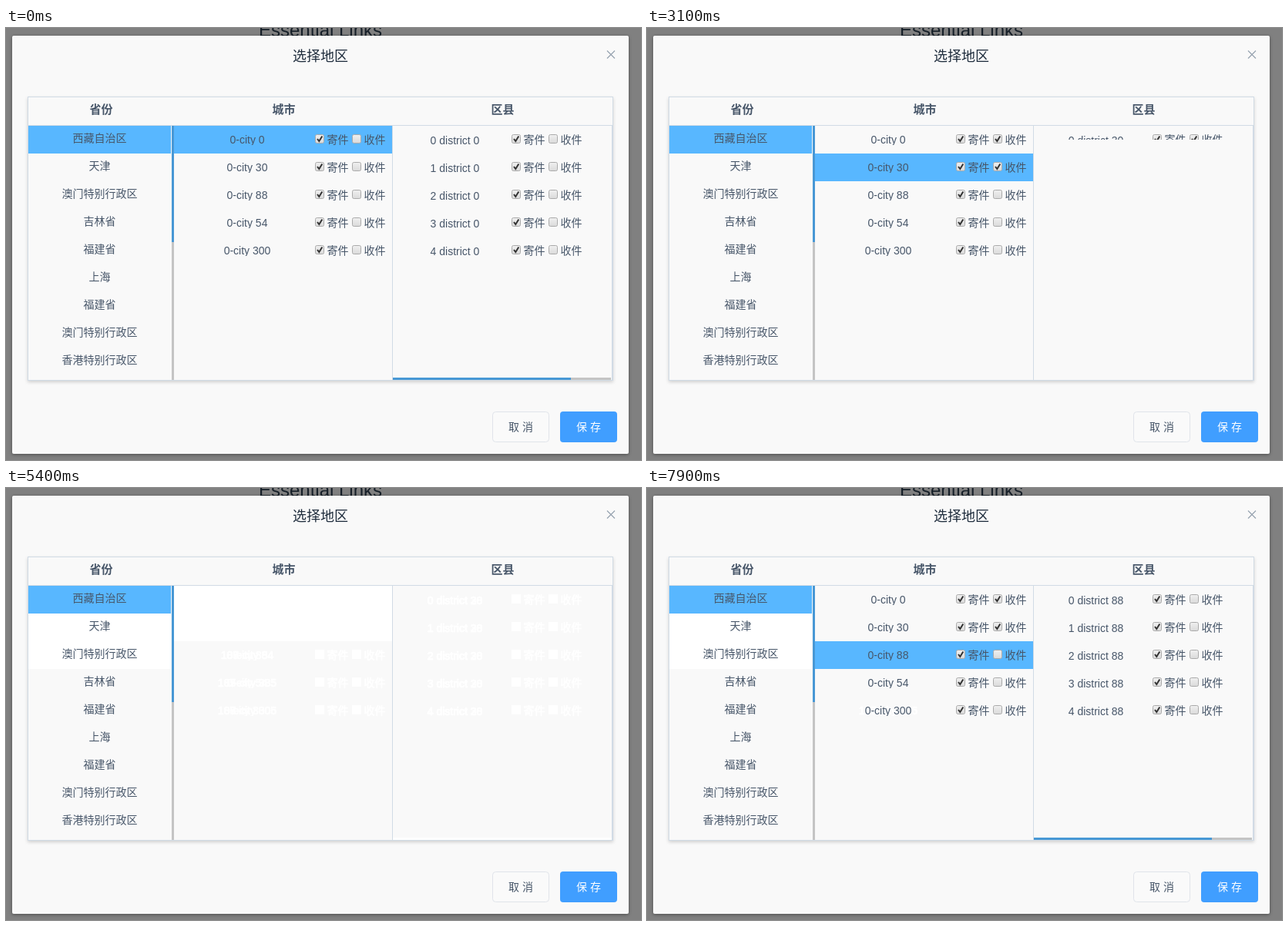
Recreate the animation shown at these times as an HTML page. Size 824x561 px, loop 9.2 s.

```html
<!DOCTYPE html>
<html lang="zh-CN">
<head>
<meta charset="utf-8">
<title>选择地区</title>
<style>
  html, body { margin: 0; width: 100%; height: 100%; overflow: hidden; background: #808080; }
  svg { display: block; width: 100vw; height: 100vh; }
  text { font: 14px "Liberation Sans", "Noto Sans CJK SC", "Noto Sans CJK", sans-serif; fill: #475669; }
  .mid { text-anchor: middle; }
  .head { font-size: 15px; font-weight: bold; }
  .title { font-size: 18px; fill: #1f2d3d; font-weight: 300; }
  .back { font-size: 24px; fill: #161f28; }
  .ghost text { fill: #fff; stroke: #fff; stroke-width: .7px; }
  .dialog { filter: drop-shadow(0 1px 2px rgba(0,0,0,.4)); }
  .table { filter: drop-shadow(0 2px 2px rgba(0,0,0,.16)); }
</style>
</head>
<body>
<svg viewBox="0 0 824 561" xmlns="http://www.w3.org/2000/svg">
  <defs>
    <linearGradient id="box" x2="0" y2="1">
      <stop stop-color="#f0f0f0"/><stop offset="1" stop-color="#dadada"/>
    </linearGradient>
    <clipPath id="line"><rect x="218" y="0" width="283" height="25"/></clipPath>
    <clipPath id="cityClip"><rect id="cityOpen" x="218" y="127" width="283" height="327"/></clipPath>
    <clipPath id="distClip"><rect id="distOpen" x="502" y="127" width="284" height="327"/></clipPath>
  </defs>
  <rect width="824" height="561" fill="#808080"/>
  <text class="mid back" x="408" y="11">Essential Links</text>
  <rect class="dialog" x="8" y="10" width="800" height="543" rx="2" fill="#f9f9f9"/>
  <text class="mid title" x="408" y="43">选择地区</text>
  <path d="M780 29.5l10 10m0-10l-10 10" stroke="#97a3b0" stroke-width="1.2"/>
  <rect class="table" x="28.5" y="89.5" width="759" height="368" fill="#f9f9f9" stroke="#d1dbe5"/>
  <text class="mid head" x="123.5" y="111">省份</text>
  <text class="mid head" x="360.5" y="111">城市</text>
  <text class="mid head" x="644.5" y="111">区县</text>
  <g id="provinces"></g>
  <g id="ghosts" class="ghost"></g>
  <g id="cities" clip-path="url(#cityClip)"></g>
  <g id="districts" clip-path="url(#distClip)"></g>
  <path d="M29 126.5H787M501.5 127V457M786.5 127V457" stroke="#d1dbe5"/>
  <rect x="215" y="127" width="3" height="330" fill="#c4c4c4"/>
  <rect x="215" y="127" width="3" height="151" fill="#4898d5"/>
  <g id="bar"></g>
  <rect x="631.5" y="498.5" width="73" height="39" rx="4" fill="#fafafa" stroke="#e0e4ea"/>
  <text class="mid" x="668" y="523">取 消</text>
  <rect x="719" y="498" width="74" height="40" rx="4" fill="#409eff"/>
  <text class="mid" x="756" y="523" style="fill:#fff">保 存</text>
</svg>
<script>
const LOOP = 9200, TOP = 127, ROW = 36, FULL = 327;
const BLUE = '#58b7ff', HOVER = '#e4e8f1', PLAIN = '#f9f9f9';
const provinces = ['西藏自治区', '天津', '澳门特别行政区', '吉林省', '福建省', '上海', '福建省', '澳门特别行政区', '香港特别行政区'];
const lists = [
  { id: 0, ids: [0, 30, 88, 54, 300] },
  { id: 105, ids: [20, 67, 34, 385, 306] },
  { id: 187, ids: [28, 71, 54, 335, 305] }
];

const start = {
  prov: 0, city: 0, over: '', openCity: FULL, openDist: FULL,
  got: [], white: [], whiteProv: [], ghostRows: [], ghostLists: [], ghostDist: []
};
const steps = [[0, start]];
const at = (time, change) => steps.push([time, change]);

// A list unfolds in three pictures, 100 ms apart.
function unfold(time, keys) {
  [18, 100, FULL].forEach((h, i) =>
    at(time + i * 100, Object.fromEntries(keys.map(k => [k, h]))));
}
function pickCity(time, city, more) {
  at(time, { city, over: '', ...more });
  unfold(time, ['openDist']);
}
function pickProvince(time, prov, more) {
  at(time, { prov, city: 0, over: '', openCity: 0, openDist: 0, ...more });
  unfold(time + 100, ['openCity', 'openDist']);
}

at(100, { over: 'd1' });
at(200, { over: 'c1' });
pickCity(800, 1);
at(1300, { over: 'c0' });
pickCity(1400, 0);
pickCity(2400, 0, { got: [0] });
at(2700, { over: 'c1' });
pickCity(3100, 1, { got: [0, 1] });
at(3400, { over: 'p1' });
pickProvince(3900, 1, {
  white: [1], whiteProv: [0], ghostRows: [0, 2, 3, 4], ghostLists: [0], ghostDist: [30]
});
at(4400, { over: 'p2' });
pickProvince(4700, 2, {
  white: [0, 1], whiteProv: [0, 1], ghostRows: [2, 3, 4], ghostLists: [0, 1], ghostDist: [30, 20]
});
at(5100, { over: 'p0' });
pickProvince(5400, 0, {
  whiteProv: [1, 2], ghostLists: [0, 1, 2], ghostDist: [30, 20, 28]
});
at(6400, { over: 'c1', white: [] });
pickCity(6700, 1);
at(7000, { over: 'c2', ghostRows: [3, 4] });
pickCity(7300, 2);
at(7600, { over: 'c3', ghostRows: [4] });
at(7700, { over: 'c1' });
at(7800, { over: 'c0' });
at(7900, { over: '' });

const $ = id => document.getElementById(id);
const rect = (x, y, w, h, fill) => `<rect x="${x}" y="${y}" width="${w}" height="${h}" fill="${fill}"/>`;
const text = (x, y, s, extra = '') => `<text x="${x}" y="${y}" ${extra}>${s}</text>`;
const mid = (x, y, s, extra = '') => text(x, y, s, 'class="mid" ' + extra);
const row = (i, body) => `<g transform="translate(0 ${TOP + i * ROW})">${body}</g>`;
const cityName = (list, i) => `${list.id}-city ${list.ids[i]}`;
const cityText = s => mid(313, 23, s, 'clip-path="url(#line)"');
const distText = s => mid(582.5, 24, s);

function check(x, label, on) {
  return `<rect x="${x + .5}" y="11.5" width="11" height="11" rx="2" fill="url(#box)" stroke="#aaa"/>` +
    (on ? `<path d="M${x + 3} 17l2.3 3 4-6.5" fill="none" stroke="#333" stroke-width="2"/>` : '') +
    text(x + 15.5, 23, label);
}
const checks = (x, got) => check(x, '寄件', true) + check(x + 48, '收件', got);
const ghostChecks = x => rect(x, 11, 12, 12, '#fff') + rect(x + 48, 11, 12, 12, '#fff') +
  text(x + 15.5, 23, '寄件') + text(x + 63.5, 23, '收件');

function draw(s) {
  const list = lists[s.prov];
  const rows = f => list.ids.map((_, i) => row(i, f(i))).join('');
  const fill = (kind, i, chosen) => chosen ? BLUE : s.over === kind + i ? HOVER : '';
  const got = i => s.prov === 0 && s.got.includes(i);

  $('provinces').innerHTML = provinces.map((name, i) => {
    const color = fill('p', i, s.prov === i) || (s.whiteProv.includes(i) ? '#fff' : '');
    return row(i, (color ? rect(29, 0, 185, ROW, color) : '') + mid(121.5, 21, name));
  }).join('');

  $('ghosts').innerHTML =
    s.white.map(i => row(i, rect(218, 0, 283, ROW, '#fff'))).join('') +
    s.ghostRows.map(i => row(i,
      s.ghostLists.map(n => cityText(cityName(lists[n], i))).join('') + ghostChecks(401))).join('') +
    (s.ghostDist.length ? rows(i =>
      s.ghostDist.map(n => distText(`${i} district ${n}`)).join('') + ghostChecks(656)) : '');

  $('cities').innerHTML = rows(i => {
    const color = fill('c', i, s.city === i);
    return (color ? rect(218, 0, 283, ROW, color) : '') + cityText(cityName(list, i)) + checks(401, got(i));
  });

  $('districts').innerHTML = rect(502, TOP, 284, FULL, PLAIN) + rows(i => {
    const color = fill('d', i, false);
    return (color ? rect(502, 0, 284, ROW, color) : '') +
      distText(`${i} district ${list.ids[s.city]}`) + checks(656, got(s.city));
  });

  $('cityOpen').setAttribute('height', s.openCity);
  $('distOpen').setAttribute('height', s.openDist);
  $('bar').innerHTML = s.openDist === FULL
    ? rect(502, 454, 283, 3, '#c4c4c4') + rect(502, 454, 231, 3, '#4898d5')
    : s.ghostDist.length ? rect(502, 454, 284, 3, '#fff') : '';
}

let shown = -1;
function tick(now) {
  const t = now % LOOP;
  const past = steps.filter(step => step[0] <= t);
  if (past.length !== shown) {
    shown = past.length;
    draw(Object.assign({}, ...past.map(step => step[1])));
  }
  requestAnimationFrame(tick);
}
const begin = performance.now();
const loop = () => tick(Math.max(0, performance.now() - begin));
requestAnimationFrame(function frame() {
  const t = Math.max(0, performance.now() - begin) % LOOP;
  const past = steps.filter(step => step[0] <= t);
  if (past.length !== shown) {
    shown = past.length;
    draw(Object.assign({}, ...past.map(step => step[1])));
  }
  requestAnimationFrame(frame);
});
</script>
</body>
</html>
```
